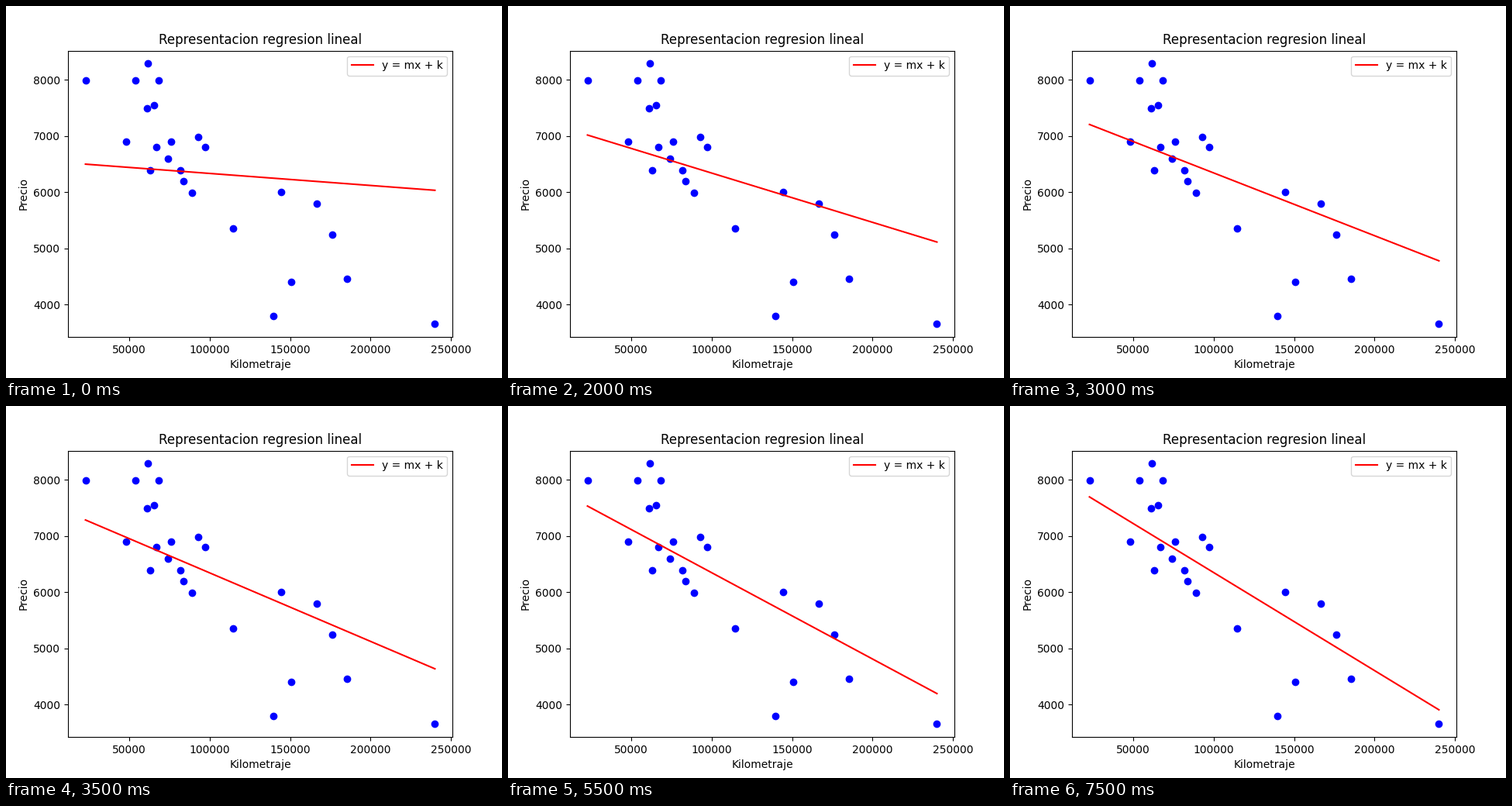
Animation, 640 px wide and 480 px high, one loop 8 s. Source, as a matplotlib script:

```python
import numpy as np
import matplotlib.pyplot as plt
from matplotlib.animation import FuncAnimation

STEPS = 16
INTERVAL = 500
RATE = 0.1

plt.rcParams["font.family"] = "DejaVu Sans"

# The plotted cars: (kilometres, price)
cars = [(240000, 3650), (139800, 3800), (150500, 4400), (185530, 4450),
        (176000, 5250), (114800, 5350), (166800, 5800), (89000, 5990),
        (144500, 5999), (84000, 6200), (82029, 6390), (63060, 6390),
        (74000, 6600), (97500, 6800), (67000, 6800), (76025, 6900),
        (48235, 6900), (93000, 6990), (60949, 7490), (65674, 7555),
        (54000, 7990), (68500, 7990), (22899, 7990), (61789, 8290)]
km, price = np.array(cars).T

best_slope = np.polyfit(km - km.mean(), price, 1)[0]
ends = np.array([km.min(), km.max()])


def predict(step):
    """Gradient descent: the line pivots about the mean towards the best fit."""
    slope = best_slope * (1 - (1 - RATE) ** (step + 1))
    return price.mean() + slope * (ends - km.mean())


fig, ax = plt.subplots(figsize=(6.4, 4.8), dpi=100)
ax.scatter(km, price, color="blue")
line, = ax.plot(ends, predict(0), color="red", label="y = mx + k")
ax.set_title("Representacion regresion lineal")
ax.set_xlabel("Kilometraje")
ax.set_ylabel("Precio")
ax.legend(loc="upper right")


def update(step):
    line.set_ydata(predict(step))
    return line,


anim = FuncAnimation(fig, update, frames=STEPS, interval=INTERVAL,
                     repeat=True, repeat_delay=0)
plt.show()
```
